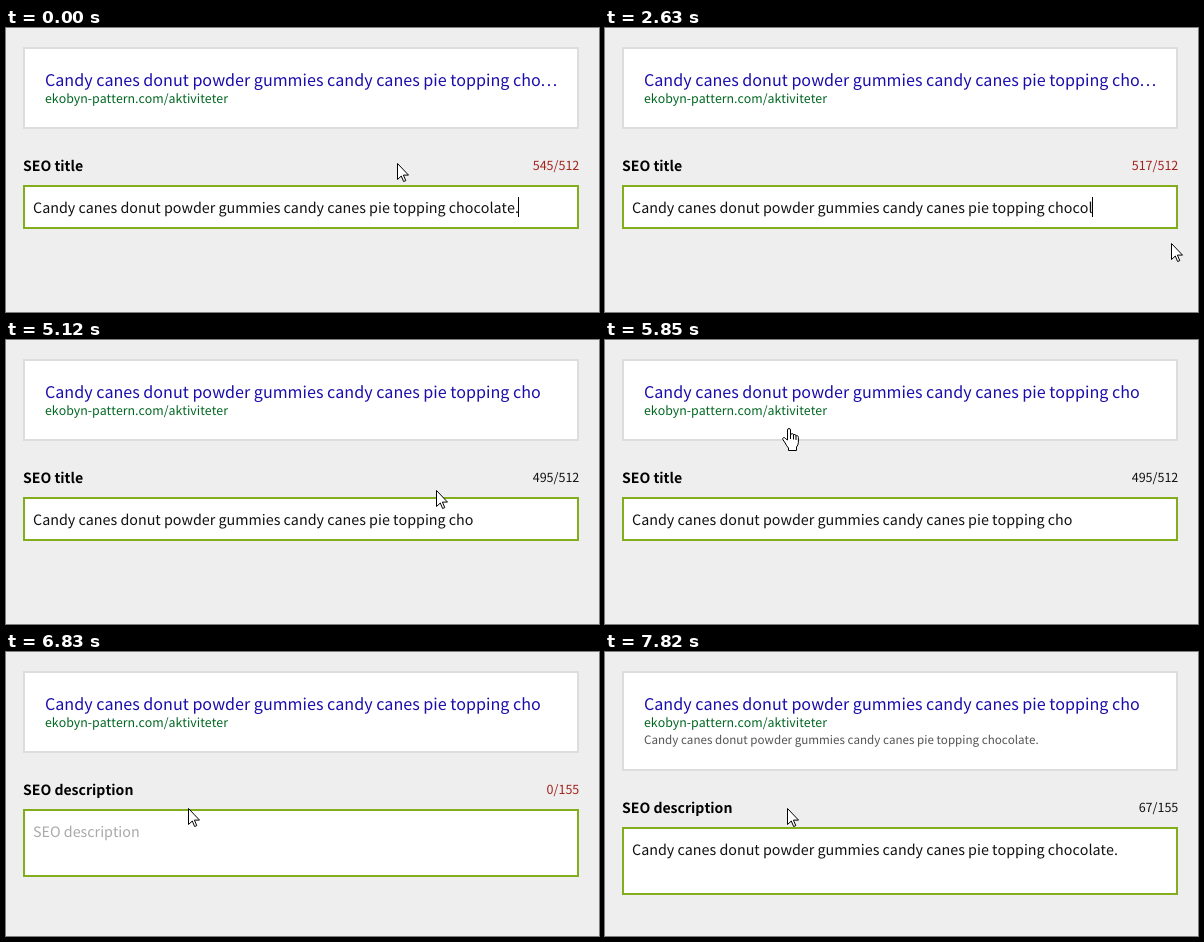
Recreate the animation shown at these times as an HTML page with a canvas. Size 593x284 px, loop 8 s.

```html
<!DOCTYPE html>
<html lang="en">
<head>
<meta charset="utf-8">
<title>SEO preview</title>
<style>
  html, body { margin: 0; width: 100%; height: 100%; overflow: hidden; background: #eee; }
  canvas { display: block; }
</style>
</head>
<body>
<canvas id="stage" width="593" height="284"></canvas>
<script>
const ctx = document.getElementById('stage').getContext('2d');
const LOOP = 8000;
const SENTENCE = 'Candy canes donut powder gummies candy canes pie topping chocolate.';
const FAMILY = '"Noto Sans CJK JP", "Noto Sans CJK SC", "Noto Sans CJK", "Open Sans", sans-serif';
const FONT_SCALE = 0.895; // the Latin letters of this family are drawn large for their size
const RED = '#a3211b', INK = '#111', GREEN = '#82ae1e';
const TITLE_LIMIT = 512;

// Title width shown by the counter after each deleted character.
const titleWidths = [545, 541, 532, 526, 517, 513, 503, 495];

// [time, characters deleted in the field, characters deleted in the preview]
const deletions = [
  [0, 0, 0], [2090, 1, 1], [2230, 2, 2], [2360, 3, 3], [2500, 4, 3], [2630, 4, 4],
  [2750, 5, 5], [2900, 6, 5], [3050, 6, 6], [3170, 7, 6], [3300, 7, 7]
];

// [time, caret visible]
const caretBlinks = [
  [0, 1], [130, 0], [710, 1], [1260, 0], [1810, 1], [3860, 0], [4290, 1],
  [4820, 0], [5400, 1], [5850, 0], [6260, 1], [6830, 0], [7360, 1], [7820, 0]
];

// [time, pointer, x, y]
const pointerSteps = [
  [0, 'arrow', 391, 135], [130, 'arrow', 571, 152], [400, 'arrow', 567, 137],
  [1140, 'beam', 561, 192], [1260, 'arrow', 564, 208], [1410, 'arrow', 566, 215],
  [4970, 'beam', 520, 190], [5120, 'arrow', 430, 150], [5260, 'arrow', 330, 120],
  [5400, 'hand', 250, 94], [5550, 'hand', 198, 80], [5700, 'hand', 182, 73],
  [5850, 'hand', 183, 88], [6560, 'arrow', 183, 125], [6690, 'arrow', 182, 156]
];

const current = (steps, t) => steps.findLast(step => step[0] <= t);

function setFont(size, weight = 'normal') {
  ctx.font = `${weight} ${size * FONT_SCALE}px ${FAMILY}`;
  ctx.fontKerning = 'none';
  ctx.textRendering = 'geometricPrecision';
}

function text(str, x, y, size, color, { weight, align = 'left' } = {}) {
  setFont(size, weight);
  ctx.textAlign = align;
  ctx.fillStyle = color;
  ctx.fillText(str, x, y);
}

function box(y, height, border) {
  ctx.fillStyle = border;
  ctx.fillRect(17, y, 556, height);
  ctx.fillStyle = '#fff';
  ctx.fillRect(19, y + 2, 552, height - 4);
}

function outline(path) {
  ctx.fillStyle = '#fff';
  ctx.strokeStyle = '#000';
  ctx.lineWidth = 1;
  ctx.fill(path);
  ctx.stroke(path);
}

const arrowPath = new Path2D('M.5 .5V16.5L4.3 13 6.6 18.5 8.8 17.6 6.4 12.1H11.5Z');
const handPath = new Path2D(
  'M5.5 12V2Q5.5 .5 7 .5T8.5 2V7Q9 5.5 10.3 5.6T11.5 7.2Q12 6.2 13 6.5T14 8.2' +
  'Q14.6 7.3 15.5 7.7T16.4 9.5V14.5Q16.3 17 14.5 19V22.5H6.5V20Q4.5 18 3.2 15' +
  'L.9 11.6Q.2 10.2 1.5 9.7T3.8 10.8Z');
const knuckles = new Path2D('M8.5 7V11M11.5 7V11.5M14 8V12');

const pointers = {
  arrow() { outline(arrowPath); },
  hand() {
    ctx.translate(-6, 0);
    outline(handPath);
    ctx.stroke(knuckles);
  },
  beam() {
    ctx.globalCompositeOperation = 'difference';
    ctx.fillStyle = '#fff';
    ctx.fillRect(0, -6, 1, 13);
    for (const y of [-7, 7]) {
      ctx.fillRect(-3, y, 3, 1);
      ctx.fillRect(1, y, 3, 1);
    }
  }
};

function drawPointer(t) {
  const [, kind, x, y] = current(pointerSteps, t);
  ctx.save();
  ctx.translate(x, y);
  pointers[kind]();
  ctx.restore();
}

function drawPreview(deleted, withDescription) {
  box(19, withDescription ? 100 : 82, '#ddd');
  const cut = titleWidths[deleted] > TITLE_LIMIT;
  const title = SENTENCE.slice(0, cut ? -7 : SENTENCE.length - deleted);
  text(title, 39, 58, 18, '#1a0dab');
  if (cut) {
    const end = 39 + ctx.measureText(title).width;
    for (let i = 0; i < 3; i++) text('.', end + i * 6, 58, 18, '#1a0dab');
  }
  text('ekobyn-pattern.com/aktiviteter', 39, 75, 13.8, '#006621');
  if (withDescription) text(SENTENCE, 39, 92, 13, '#545454');
}

function drawField(top, { label, value, placeholder, counter, over, height, caret }) {
  text(label, 17, top - 14, 15.7, '#000', { weight: 'bold' });
  text(counter, 573.3, top - 15, 14, over ? RED : INK, { align: 'right' });
  box(top, height, GREEN);
  if (value) text(value, 27, top + 28, 16, INK);
  else text(placeholder, 27, top + 28, 16, '#a9a9a9');
  if (caret) {
    const x = value ? Math.round(27 + ctx.measureText(value).width) - 1 : 27;
    ctx.fillStyle = '#000';
    ctx.fillRect(x, top + 12, 1, 20);
  }
}

function draw(t) {
  ctx.fillStyle = '#eee';
  ctx.fillRect(0, 0, 593, 284);
  const [, typed, shown] = current(deletions, t);
  const caret = current(caretBlinks, t)[1];
  const described = t >= 7360;
  drawPreview(shown, described);
  if (t < 6260) {
    const width = titleWidths[shown];
    drawField(157, {
      label: 'SEO title',
      value: SENTENCE.slice(0, SENTENCE.length - typed),
      counter: `${width}/${TITLE_LIMIT}`,
      over: width > TITLE_LIMIT,
      height: 44,
      caret
    });
  } else {
    const value = described ? SENTENCE : '';
    drawField(described ? 175 : 157, {
      label: 'SEO description',
      placeholder: 'SEO description',
      value,
      counter: `${value.length}/155`,
      over: !described,
      height: 68,
      caret
    });
  }
  drawPointer(t);
}

function tick() {
  draw(performance.now() % LOOP);
  requestAnimationFrame(tick);
}
tick();
</script>
</body>
</html>
```
